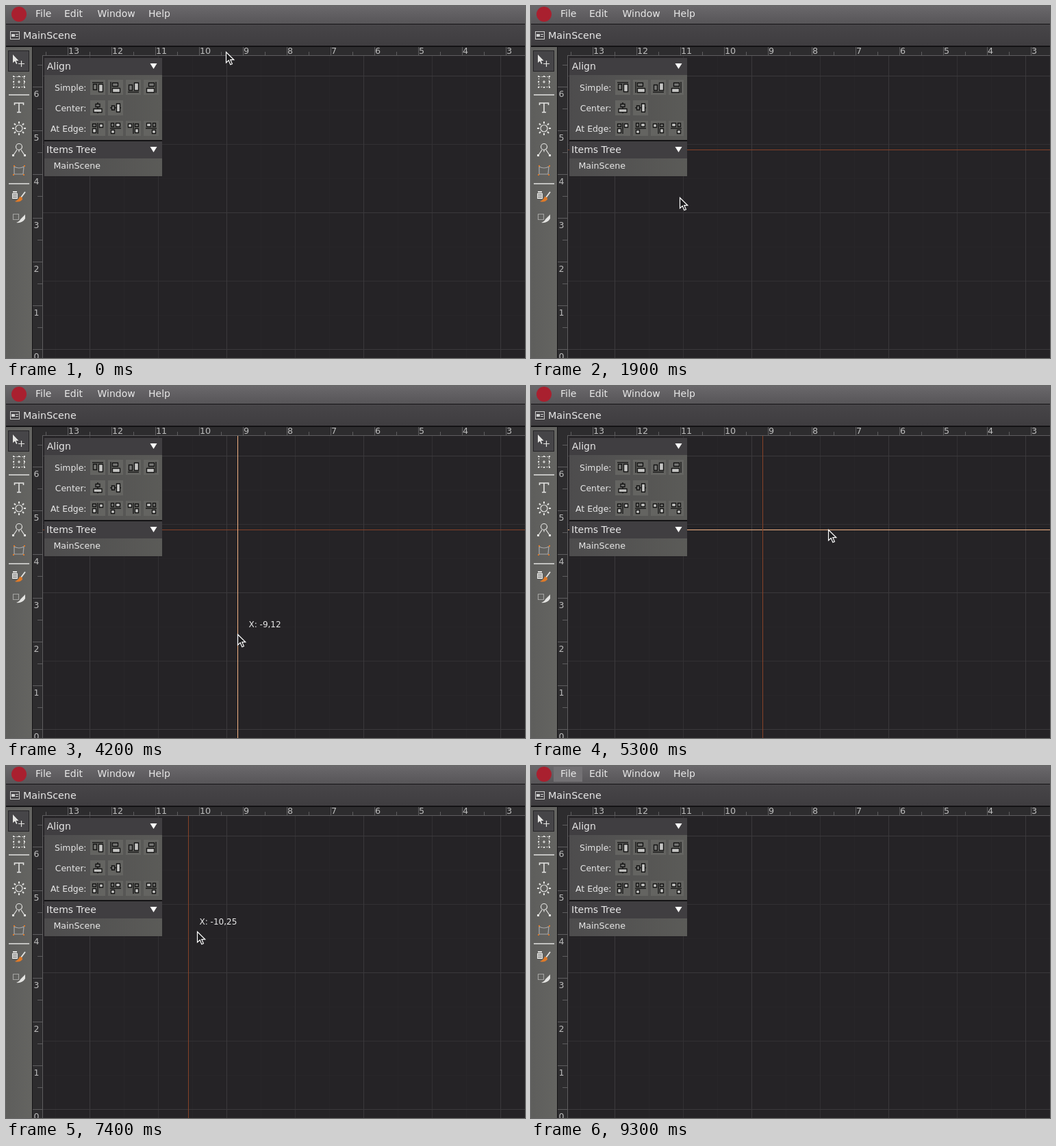
Write an HTML page that moves like this. It is 758x515 px and loops after 9600 ms.

```html
<!DOCTYPE html>
<html lang="en">
<head>
<meta charset="utf-8">
<title>Ruler guides</title>
<style>
  html, body { margin: 0; width: 100%; height: 100%; overflow: hidden; background: #252326; }
  svg { display: block; }
  text { font-family: "DejaVu Sans", sans-serif; fill: #e8e8e8; white-space: pre; }
  .ruler text { fill: #bcbcbc; }
  .tools { fill: none; stroke: #e4e4e2; stroke-width: 1.2; }
  .solid { fill: #e4e4e2; stroke: none; }
  .orange { fill: #e07a28; stroke: none; }
</style>
</head>
<body>
<svg id="stage" width="758" height="515" viewBox="0 0 758 515"></svg>
<script>
const W = 758, H = 515, LOOP = 9600, STEP = 100, LAG = 30;
const UNIT = 64, ZERO_X = 922, ZERO_Y = 502;
const HOT = '#f3b384', COLD = '#874228', BLACK = '#141315';

const rect = (x, y, w, h, fill, extra = '') =>
  `<rect x="${x}" y="${y}" width="${w}" height="${h}" fill="${fill}" ${extra}/>`;
const text = (x, y, size, str, extra = '') =>
  `<text x="${x}" y="${y}" font-size="${size}" ${extra}>${str}</text>`;
const path = (d, extra = '') => `<path d="${d}" ${extra}/>`;
const group = (extra, ...parts) => `<g ${extra}>${parts.join('')}</g>`;
const range = (from, to, step, fn) => {
  let out = '';
  for (let v = from; v < to; v += step) out += fn(v);
  return out;
};
const gradient = (id, from, to, x2, y2) =>
  `<linearGradient id="${id}" x2="${x2}" y2="${y2}">
   <stop stop-color="${from}"/><stop offset="1" stop-color="${to}"/></linearGradient>`;

function grid() {
  const lines = (step, color) =>
    range(ZERO_X % step, W, step, x => x > 54 ? rect(x, 73, 1, H, color) : '') +
    range(ZERO_Y % step, H, step, y => y > 73 ? rect(54, y, W, 1, color) : '');
  return lines(50, '#282629') + lines(100, '#323033') + lines(200, '#3b393c');
}

function rulers() {
  const tick = '#5e5d5f', back = '#2d2c2e';
  return group('class="ruler"',
    rect(39, 60, W, 13, back), rect(39, 60, 15, H, back),
    rect(54, 72, W, 1, tick), rect(53, 72, 1, H, tick),
    range(ZERO_X % UNIT + UNIT, W, UNIT, x => rect(x, 60, 1, 12, tick) +
      text(x + 1, 70, 12.7, (ZERO_X - x) / UNIT)),
    range(ZERO_X % UNIT + UNIT / 2, W, UNIT, x => rect(x, 67, 1, 5, tick)),
    range(ZERO_Y % UNIT + UNIT, H, UNIT, y => rect(39, y, 14, 1, tick) +
      text(40.5, y + 14.5, 12.5, (ZERO_Y - y) / UNIT)),
    range(ZERO_Y % UNIT + UNIT / 2, H, UNIT, y => rect(46, y, 7, 1, tick)));
}

function topBars() {
  return rect(0, 0, W, 26, 'url(#menu)') + rect(0, 26, W, 1, BLACK) +
    rect(33, 1, 42, 22, '#737174', 'id="fileHover"') +
    '<circle cx="19" cy="12" r="11" fill="#a9202f"/>' +
    text(43, 16, 14, 'File') + text(85, 16, 14, 'Edit') +
    text(133.5, 16, 14, 'Window') + text(208, 16, 14, 'Help') +
    rect(0, 27, W, 31, 'url(#tab)') + rect(0, 58, W, 2, BLACK) +
    rect(6.5, 37.5, 13, 11, 'none', 'stroke="#d0d0d0"') +
    rect(8, 41, 5, 4, '#d0d0d0') + path('M14 41.5h4M14 44.5h4', 'stroke="#d0d0d0"') +
    text(25, 48, 14.3, 'MainScene');
}

function toolbar() {
  const dots = (size, kind, r) => range(0, 8, size, i => {
    const a = i * Math.PI / 4, snap = v => Math.round(v) * r;
    return rect(18 + snap(Math.cos(a)), -1 + snap(Math.sin(a)), 2, 2, '', `class="${kind}"`);
  }).replaceAll('fill=""', '');
  const at = (y, ...parts) => group(`transform="translate(0 ${y})"`, ...parts);
  const separator = y => rect(4, y, 30, 2, '#c2c2c0', 'stroke="none"');
  return rect(0, 60, 38, H, 'url(#tools)') + rect(38, 60, 1, H, BLACK) +
    rect(3.5, 65.5, 30, 30, '#464548', 'stroke="#242326"') +
    group('class="tools"',
      path('M10 71V83L13 80.5 15 85 16.5 84.3 14.7 80H18.5Z', 'class="solid"'),
      path('M22.5 80v9M18 84.5h9'),
      at(111, rect(11.5, -7.5, 15, 15, 'none', 'stroke-dasharray="2 2"'),
        dots(1, 'solid', 8), path('M19 -2v4M17 0h4')),
      separator(129),
      at(149, path('M12.5 -4V-7H25.5V-4M19 -7V6M16 6.5h6', 'stroke-width="1.6"')),
      at(179, '<circle cx="19" r="5"/>',
        range(0, 360, 45, a => path('M19 -10v3', `stroke-width="2" transform="rotate(${a} 19 0)"`))),
      at(210, '<circle cx="19" cy="-4" r="4.5"/>',
        path('M19 .5v3M16 .5L11 8M22 .5L27 8'), path('M9 7h3v3h-3zM26 7h3v3h-3z', 'class="solid"')),
      at(241, path('M12 -6Q19 -2 26 -6L25 5H12Z', 'stroke="#aaa"'), dots(2, 'orange', 0),
        path('M11 -8h2v2h-2zM26 -8h2v2h-2zM25 5h2v2h-2zM10 5h2v2h-2z', 'class="orange"')),
      separator(259),
      at(278, path('M10 -7h6v2h-6zM9 -4h8v8h-8z', 'class="solid"'),
        path('M10 -1.5h6M10 1.5h6', 'stroke="#555"'), path('M28 -6L22 2', 'stroke-width="1.8"'),
        path('M20 1Q24 1 24 5Q20 10 13 8Q18 6 20 1Z', 'class="orange"')),
      at(311, rect(10.5, -6.5, 8, 8, 'none', 'stroke-dasharray="1 1"'),
        path('M28 -6V0Q24 7 15 6Q20 4 21 1Z', 'class="solid"')))
      .replace(dots(2, 'orange', 0), '');
}

// Each button row is one glyph, turned or mirrored for its variants.
const GLYPHS = {
  simple: { guide: 'M3 4h16', dark: 'M4.5 6.5h5v8h-5z', light: 'M12.5 6.5h6v11h-6z' },
  center: { guide: 'M3 11h16', dark: 'M5.5 8h4v6h-4z', light: 'M12.5 5h5v12h-5z' },
  edge: { guide: 'M11 3v16', dark: 'M3.5 4.5h5v4h-5z', light: 'M13.5 4.5h5v5h-5zM3.5 11.5h5v6h-5z' }
};
const SAME = '1 0 0 1 0 0', TURN = '0 1 1 0 0 0';
const FLIP_X = '-1 0 0 1 22 0', FLIP_Y = '1 0 0 -1 0 22', TURN_FLIP = '0 1 -1 0 22 0';

function buttons(y, { guide, dark, light }, turns) {
  return turns.map((turn, i) => group(`transform="translate(${123 + 26 * i} ${y})"`,
    rect(0, 0, 22, 22, '#646461'),
    group(`transform="matrix(${turn})" stroke="#111" stroke-width="1.3"`,
      path(guide), path(dark, 'fill="#777775"'), path(light, 'fill="#c6c6c4"')))).join('');
}

function panels() {
  const header = (y, x, title) => rect(56, y, 172, 25, '#403e41') +
    path(`M210.5 ${y + 8}h10l-5 8z`, 'fill="#fff"') + text(x, y + 17, 14, title);
  const label = (y, s) => text(117.5, y, 12.4, s, 'text-anchor="end"');
  return rect(56, 76, 172, 173, 'url(#panel)') +
    header(76, 59.7, 'Align') + header(198, 59, 'Items Tree') +
    rect(56, 196, 172, 2, BLACK) + text(69.5, 238, 12.6, 'MainScene') +
    label(124, 'Simple:') + label(154, 'Center:') + label(184, 'At Edge:') +
    buttons(108, GLYPHS.simple, [SAME, TURN, FLIP_Y, TURN_FLIP]) +
    buttons(138, GLYPHS.center, [TURN, SAME]) +
    buttons(168, GLYPHS.edge, [SAME, TURN, FLIP_X, TURN_FLIP]);
}

const stage = document.getElementById('stage');
stage.innerHTML = '<defs>' + gradient('menu', '#6a686b', '#575558', 0, 1) +
  gradient('tab', '#474548', '#3f3d40', 0, 1) + gradient('tools', '#5e5e5c', '#646461', 1, 0) +
  gradient('panel', '#4d4c4d', '#5b5b58', 1, 0) + '</defs>' +
  grid() + rulers() +
  rect(54, 0, W, 1, COLD, 'id="row"') + rect(0, 73, 1, H, COLD, 'id="column"') +
  text(0, 0, 12, '', 'id="readout"') +
  topBars() + toolbar() + panels() +
  path('M.5 .5V16L4.2 12.6 6.8 18.7 9.4 17.6 6.8 11.7H11.8Z',
    'id="cursor" fill="#1c1b1d" stroke="#fff" stroke-width="1.2"');
const [readout, cursor, fileHover] =
  ['readout', 'cursor', 'fileHover'].map(id => document.getElementById(id));

// Pointer moves: start, end, x, y. It rests between them.
const MOVES = [
  [0, 0, 321, 67], [700, 1600, 300, 210], [1700, 1850, 217, 280], [2000, 2400, 63, 340],
  [2500, 2700, 47, 346], [2800, 3500, 307, 361], [3500, 3800, 407, 363],
  [3800, 4100, 322, 363], [4100, 4160, 338, 363], [4700, 4760, 414, 256],
  [4900, 5260, 434, 210], [5700, 6000, 438, 97], [6000, 6150, 437, 65],
  [6500, 6760, 338, 241], [7200, 7300, 310, 242], [7300, 7400, 266, 242],
  [7400, 8200, 53, 300], [8200, 9150, 56, 5]
];
// A guide is pulled out, dropped, grabbed again and thrown back on its ruler.
const GUIDES = [
  { id: 'row', axis: 'y', zero: ZERO_Y, sign: -1, pull: 800, drop: 1700, grab: 5700, end: 6200 },
  { id: 'column', axis: 'x', zero: ZERO_X, sign: 1, pull: 2900, drop: 4700, grab: 7200, end: 8300 }
];
for (const guide of GUIDES) guide.node = document.getElementById(guide.id);

function pointer(t) {
  const [, , x0, y0] = MOVES[0];
  return MOVES.slice(1).reduce((p, [start, end, x, y]) => {
    const k = Math.min(1, Math.max(0, (t - start) / (end - start)));
    return { x: p.x + (x - p.x) * k, y: p.y + (y - p.y) * k };
  }, { x: x0, y: y0 });
}

const set = (node, attrs) => {
  for (const name in attrs) node.setAttribute(name, attrs[name]);
};
const show = (node, on) => set(node, { visibility: on ? 'visible' : 'hidden' });
const format = v => (Math.round(v * 100) / 100).toFixed(2).replace('.', ',');

function draw(t) {
  const hand = pointer(t), seen = pointer(t - LAG);
  set(cursor, { transform: `translate(${Math.round(seen.x)} ${Math.round(seen.y)})` });
  show(cursor, t < 9300);
  show(fileHover, t >= 9200);
  show(readout, false);

  for (const { node, id, axis, zero, sign, pull, drop, grab, end } of GUIDES) {
    const live = t >= pull && t < end;
    const place = Math.round(pointer(t < grab ? Math.min(t, drop) : t)[axis]);
    const near = Math.abs(seen[axis] - place) < 12;
    show(node, live);
    set(node, { [axis]: place, fill: near ? HOT : COLD });
    if (live && (t <= drop || t > grab)) {
      show(readout, true);
      set(readout, { x: Math.round(hand.x) + 16.5, y: Math.round(hand.y) - 10 });
      readout.textContent = axis.toUpperCase() + ': ' + format((place - zero) * sign / UNIT);
    }
  }
}

const start = performance.now();
function frame() {
  const t = (performance.now() - start) % LOOP;
  draw(Math.floor(t / STEP) * STEP);
  requestAnimationFrame(frame);
}
frame();
</script>
</body>
</html>
```
